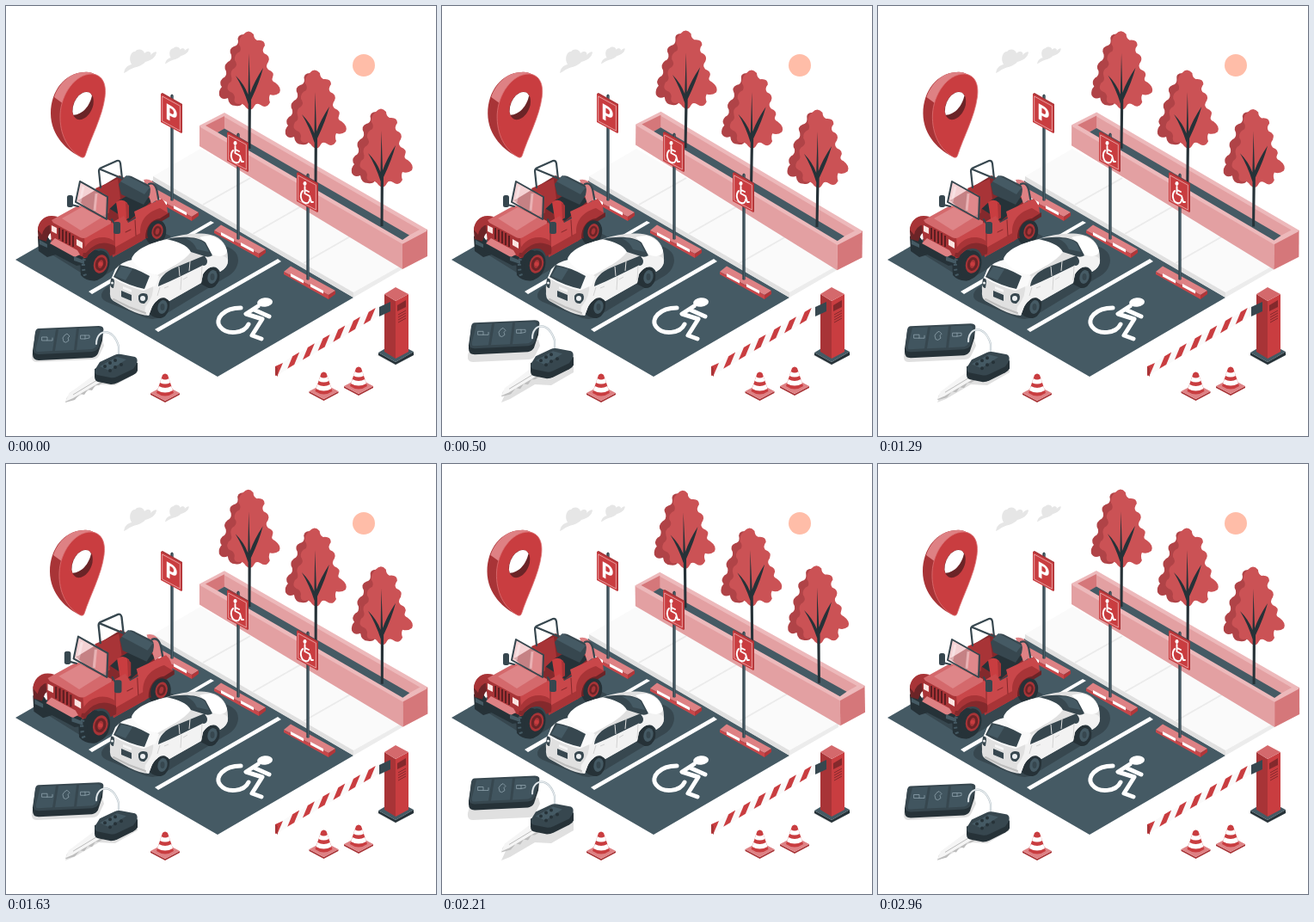
Write an HTML page that moves like this. It is 500x500 px and loops after 3 s.

```html
<!DOCTYPE html>
<html lang="en">
<head>
<meta charset="utf-8">
<title>Parking lot</title>
<style>
html, body { margin: 0; width: 100%; height: 100%; overflow: hidden; background: #fff; }
svg { display: block; width: 100vw; height: 100vh; }
.red { fill: #c93d40; } .deep { fill: #a83437; } .maroon { fill: #84292c; } .wine { fill: #6b2427; }
.side { fill: #c9474a; } .rose { fill: #de8184; } .pink { fill: #e3a0a2; } .pale { fill: #edb9bb; }
.slate { fill: #455a64; } .dark { fill: #37474f; } .ink { fill: #263238; }
.white { fill: #fff; } .mist { fill: #e6e6e6; }
.line { fill: none; stroke-linecap: round; stroke-linejoin: round; }
</style>
</head>
<body>
<svg viewBox="0 0 500 500">
<defs>
  <g id="tree">
    <path fill="#b04347" d="M277 33Q268 33 270 41Q270 46 265 47Q258 50 262 57Q263 63 258 65Q252 70 256 76Q257 82 252 84Q247 89 251 94Q247 98 248 104Q251 110 258 107Q259 116 267 116Q273 117 275 113L296 108L300 60Z"/>
    <path fill="#cb5255" d="M276 33Q282 26 288 33Q288 38 292 40Q301 39 301 46Q297 51 300 55Q308 58 305 65Q301 70 305 74Q313 77 310 83Q308 87 313 89Q321 95 318 101Q313 105 307 103Q305 107 307 112Q303 120 296 115Q291 112 289 116Q285 124 279 118Q275 112 271 114Q264 114 266 106Q265 101 261 100Q255 97 259 90Q264 87 262 82Q260 75 266 72Q270 68 266 63Q265 56 272 53Q274 49 271 45Q270 38 276 33Z"/>
    <path class="ink" d="M281.500 166L281.700 114Q276 96 267 81Q277 91 281.500 103L282.500 55L284 101Q289 87 299 72Q295 88 285 109L284.500 166Z"/>
  </g>
  <g id="stop">
    <path class="rose" d="M242 261L250 254.500L302 283L294 288Z"/>
    <path class="side" d="M242 261L294 288V293L242 264Z"/>
    <path fill="#b33639" d="M294 288L302 283V287L294 293Z"/>
    <path class="white" d="M250 263L265 271V274.500L250 266.500ZM273 275L288 283V286.500L273 278.500Z"/>
  </g>
  <g id="panel">
    <path class="deep" d="M257 147L259 146L282 159V192L281 193Z"/>
    <path class="red" d="M257 147L281 160V193L257 180Z"/>
    <path fill="none" stroke="#f1c4c5" stroke-width=".7" d="M258.700 150L279.300 161.200V190L258.700 178.800Z"/>
  </g>
  <g id="post">
    <path class="dark" d="M268.300 149Q270 146 271.700 149V271Q270 272 268.300 271Z"/>
    <path stroke="#607d8b" stroke-width=".5" d="M270.500 149V271"/>
  </g>
  <g id="access">
    <use href="#post"/><use href="#panel"/>
    <ellipse class="white" cx="266.500" cy="159.500" rx="2" ry="2.400"/>
    <path class="line" stroke="#fff" stroke-width="1.900" d="M266.500 163V171L272 174L274 181L276 181M267 167L271 169M264 168C260 172 262 181 267 182C270 183 272 181 272 178"/>
  </g>
  <g id="cone">
    <path class="deep" d="M168 450L185 459V461L168 452ZM202 450L185 459V461L202 452Z"/>
    <path class="rose" d="M168 450L185 441L202 450L185 459Z"/>
    <path class="red" d="M182 429Q185 426 188 429L195 450Q185 457 175 450Z"/>
    <path class="white" d="M180.700 433Q185 436 189.400 433L191 438Q185 441 179 438ZM177.800 442Q185 446 192.300 442L194 447Q185 452 176 447Z"/>
  </g>
  <path id="cloud" class="mist" d="M137 78C138 72 141 69 146 68C142 61 145 53 150 53C153 49 160 50 161 55C165 51 170 54 168 57C171 54 175 52 175 54C174 60 169 63 162 65C158 70 150 71 146 73C143 74 140 77 137 78Z"/>
</defs>

<use href="#cloud"/>
<use href="#cloud" transform="translate(85 10.500) scale(.73)"/>
<circle cx="416" cy="69" r="13" fill="#ffbda8"/>

<!-- ground -->
<path class="slate" d="M11 295L171 203L404 339L246 431Z"/>
<path class="white" d="M96 332L238 250L242 252L100 335ZM173 376L316 294L320 297L177 379Z"/>
<path fill="#fafafa" d="M171 198L226 166L461 302L404 333Z"/>
<path fill="#e0e0e0" d="M171 198L404 333V339L171 204Z"/>
<path fill="#ececec" d="M404 333L461 301V306L404 339Z"/>
<path fill="none" stroke="#ebebeb" stroke-width="2" d="M229 231L284 200M287 265L343 233M346 299L402 267"/>
<g class="line" stroke="#fff" stroke-width="5">
  <path d="M293 349L279 358L298 364L286 383L297 387M288 353L306 361"/>
  <path d="M273 351C253 351 242 364 249 373C257 383 277 381 282 370"/>
</g>
<ellipse class="white" cx="301" cy="344.500" rx="9" ry="5.200" transform="rotate(-6 301 344)"/>

<g id="garden">
  <path class="pale" d="M225 139L254 124L490 260L461 276Z"/>
  <path class="pink" d="M254 129L481 260L468 267L254 144Z"/>
  <path fill="#d5777a" d="M232 139L254 128V143L246 147Z"/>
  <path class="slate" d="M246 147L254 142.500L469 266.500L461 272Z"/>
  <path class="pink" d="M225 139L461 276V306L225 163Z"/>
  <path fill="#d5777a" d="M461 276L490 260V291L461 306Z"/>
  <path fill="none" stroke="#edb9bb" stroke-width="1.500" d="M226 140L461 276L489 261"/>
  <use href="#tree"/>
  <use href="#tree" x="77" y="45"/>
  <use href="#tree" x="154" y="90"/>
</g>

<use href="#stop" x="-78" y="-43"/><use href="#stop"/><use href="#stop" x="81" y="48"/>
<use href="#post" x="-77" y="-45"/><use href="#panel" x="-77" y="-45"/>
<text class="white" transform="matrix(.866 .5 0 1 192 134.500)" text-anchor="middle" font-family="Lato,'Open Sans',sans-serif" font-weight="900" font-size="25">P</text>
<use href="#access"/><use href="#access" x="81" y="47"/>

<g id="jeep">
  <path class="dark" d="M42 282L103 320L192 268L130 235Z"/>
  <path class="ink" d="M37 268Q45 262 51 272L58 289L48 292L38 285ZM86 293Q94 282 106 284L118 292Q120 312 106 319Q94 321 87 313Z"/>
  <ellipse class="ink" cx="174" cy="263" rx="12" ry="15" transform="rotate(14 174 263)"/>
  <!-- cabin -->
  <path class="maroon" d="M84 226L132 197L174 218L168 235L122 263Z"/>
  <path class="ink" d="M118 234L152 214L170 226L143 250Z"/>
  <path class="deep" d="M104 212L130 201L133 224L116 240Z"/>
  <path class="rose" d="M160 202Q169 200 174 209L177 224L169 230Z"/>
  <path class="dark" d="M131 207L138 199Q141 196 146 198L166 208Q169 211 167 220L160 231L134 219Z"/>
  <path class="slate" d="M133 204L140 197L167 211L161 219Z"/>
  <path class="red" d="M104 219Q110 214 117 220L120 240L108 246L102 235ZM128 228Q135 223 141 229L143 246L132 253Z"/>
  <path class="deep" d="M115 220Q119 221 119 228L120 240L116 242ZM139 228L143 232V246L140 248Z"/>
  <path class="line" stroke="#37474f" stroke-width="2.200" d="M110 211L108 192Q108 189 111 188L129 180Q132 179 133 183L135 201M110 190L134 200M166 207Q174 204 176 218L178 229"/>
  <!-- body side -->
  <path class="side" d="M121 253L137 244L142 252L151 247L149 239L181 224Q188 230 188 242L162 258L158 273L124 292Z"/>
  <path class="deep" d="M126 281L158 263L158 273L124 292Z"/>
  <path class="line" stroke="#84292c" stroke-width="1" d="M126 261V284M150 249L151 267M139 263L145 260"/>
  <path class="deep" d="M156 263C156 247 166 239 179 235L189 241Q182 246 178 249C168 251 162 261 163 270L157 274Z"/>
  <path class="wine" d="M162 270C162 257 169 248 179 247L190 240V245L180 251C173 252 168 260 167 270Z"/>
  <ellipse class="ink" cx="175" cy="263" rx="10.500" ry="14" transform="rotate(14 175 263)"/>
  <ellipse class="deep" cx="176" cy="262" rx="6.500" ry="9" transform="rotate(14 176 262)"/>
  <ellipse class="line" stroke="#6b2427" stroke-width="2.500" cx="176" cy="262" rx="3.500" ry="5" transform="rotate(14 176 262)"/>
  <!-- nose -->
  <path class="wine" d="M37 262C37 251 45 244 56 247L59 257L50 266L45 278L38 273Z"/>
  <path class="deep" d="M37 260C38 249 46 241 60 245L53 254Q44 256 42 266Z"/>
  <path class="deep" d="M51 253Q52 247 57 248L92 268L93 293L85 294L53 276Z"/>
  <path class="side" d="M91 269L122 251L126 283L107 280L93 291Z"/>
  <path fill="#d4696c" d="M53 249L82 233Q86 231 90 234L122 250Q123 253 120 254L94 269Q90 271 86 269L55 252Z"/>
  <path fill="#de8588" d="M65 247L88 234L111 246L87 261Z"/>
  <path fill="none" stroke="#5c1e21" stroke-width="2" d="M62 258V271M66 260V274M70 262V276M74 264V278M78 267V280"/>
  <path fill="#fbe4e1" d="M53 255L59 258V265L53 262ZM82 271L89 275V282L82 278Z"/>
  <path class="maroon" d="M89 291C91 277 106 267 122 274Q129 277 127 288L121 291Q118 281 109 282Q98 283 94 293Z"/>
  <path class="deep" d="M89 287C93 273 108 265 122 271Q127 273 127 279Q108 269 93 287Z"/>
  <path class="ink" d="M38 271L57 277L90 292L89 301L82 302L46 283L38 280Z"/>
  <path class="rose" d="M51 276L80 292L86 289L83 284L57 270Z"/>
  <path class="slate" d="M39 272L48 277V281L39 277ZM79 291L91 296V300L79 296Z"/>
  <ellipse class="ink" cx="108" cy="301" rx="12" ry="17" transform="rotate(16 108 301)"/>
  <ellipse class="deep" cx="110" cy="300" rx="8" ry="11" transform="rotate(16 110 300)"/>
  <ellipse class="line" stroke="#6b2427" stroke-width="3" cx="110" cy="300" rx="4.500" ry="6.500" transform="rotate(16 110 300)"/>
  <circle class="red" cx="110" cy="300" r="2.500"/>
  <path stroke="#455a64" stroke-width="4" stroke-dasharray="2 4" fill="none" d="M91 294Q88 304 93 316"/>
  <!-- windshield and mirrors -->
  <path fill="#edb7ba" fill-opacity=".62" stroke="#37474f" stroke-width="2" stroke-linejoin="round" d="M86 204L118 222L117 248L81 228Z"/>
  <path stroke="#fff" stroke-opacity=".35" stroke-width="3" d="M90 210L86 228M105 218L103 238"/>
  <path class="line" stroke="#37474f" stroke-width="2" d="M76 231L84 233M123 248L127 255"/>
  <rect class="dark" x="71" y="220" width="7" height="14" rx="2.500"/>
  <rect class="dark" x="125" y="251" width="8" height="14" rx="2.500"/>
</g>

<!-- white car -->
<path class="dark" d="M111 335Q115 324 130 324L244 277Q270 280 270 296Q269 309 255 316L181 361Q171 367 158 361L117 344Q110 341 111 335Z"/>
<path class="ink" d="M225 312Q229 301 241 303Q250 307 248 318Q245 328 236 328L226 323ZM166 352Q170 338 182 338L190 344Q191 358 180 363Q171 363 166 357Z"/>
<path fill="#e0e0e0" d="M121 331C120 315 128 303 146 296C151 284 169 275 187 271C204 265 223 263 238 266C252 269 258 280 258 293C259 302 254 306 249 309C245 300 235 302 229 312L227 322L190 343C184 336 173 341 169 352L166 360Q157 360 143 353L125 343Q120 340 121 331Z"/>
<path fill="#f2f2f2" d="M171 322C178 316 179 313 190 309L231 291L249 290Q257 291 258 296Q258 304 249 309C245 300 235 302 229 312L227 322L190 343C184 336 173 341 169 352L166 360Q160 358 162 350Q173 337 171 322Z"/>
<path class="white" d="M232 275L240 290L249 291Q257 290 257 285Q253 271 238 267Q230 267 225 269Z"/>
<path fill="#fafafa" d="M127 306Q135 297 147 295Q164 309 178 314L174 325L160 331Q140 326 123 316Z"/>
<path class="white" d="M146 294C150 282 173 273 188 272C205 274 214 280 215 286C207 297 190 305 176 313Q153 308 146 294Z"/>
<path class="dark" d="M132 301Q150 304 167 314L161 329Q142 325 125 315Z"/>
<path class="slate" d="M134 303L147 306L139 319L127 314Z"/>
<path class="dark" d="M187 271C204 267 224 268 232 275L240 290Q236 293 231 291L215 286C211 278 200 274 187 271Z"/>
<path class="slate" d="M209 270Q226 270 231 276L236 286L222 283Q219 275 209 270Z"/>
<path class="dark" d="M177 326C178 316 185 309 197 304L231 290L233 295L228 302C211 310 194 319 177 326Z"/>
<path fill="none" stroke="#c9c9c9" stroke-width=".8" d="M204 315L203 330M228 302L227 319M179 327L176 337M206 318L211 315M184 328L189 326"/>
<path stroke="#e0e0e0" stroke-width="1" d="M201 303L202 314M214 297L213 308"/>
<ellipse class="dark" cx="230" cy="297" rx="4" ry="5"/>
<path class="dark" d="M122 317Q126 316 126 321L125 328Q122 328 121 324ZM134 331L146 336V343L134 338ZM154 337Q157 332 164 335Q167 341 161 346Q153 347 154 337Z"/>
<path fill="#f5f5f5" d="M136 326L146 330V333L136 329Z"/>
<circle cx="159" cy="340" r="3" fill="#eceff1"/><circle cx="123.500" cy="322" r="1.500" fill="#eceff1"/>
<path class="line" stroke="#bdbdbd" stroke-width="2" d="M125 341L143 350L162 357"/>
<g class="ink">
  <ellipse cx="181" cy="351" rx="8.500" ry="12" transform="rotate(14 181 351)"/>
  <ellipse cx="239" cy="316" rx="8.500" ry="12" transform="rotate(14 239 316)"/>
</g>
<g class="slate">
  <ellipse cx="182" cy="350" rx="5.500" ry="8" transform="rotate(14 182 350)"/>
  <ellipse cx="240" cy="315" rx="5.500" ry="8" transform="rotate(14 240 315)"/>
</g>
<g class="dark">
  <ellipse cx="182" cy="350" rx="2.500" ry="4"/><ellipse cx="240" cy="315" rx="2.500" ry="4"/>
</g>

<!-- barrier -->
<path class="mist" d="M431 406L453 394L476 405L453 418Z"/>
<path class="ink" d="M433 403L453 414L474 402V406L453 417L433 406Z"/>
<path class="slate" d="M433 403L453 391L474 402L453 414Z"/>
<path class="deep" d="M440 335L453 343V410L440 402Z"/>
<path class="red" d="M453 343L468 335V402L453 410Z"/>
<path fill="#d4696c" d="M440 335L453 327L468 335L453 343Z"/>
<path class="maroon" d="M455 348L465 342V350L455 355Z"/>
<path fill="none" stroke="#84292c" stroke-width="1" d="M456 359L465 354M456 362L465 357M456 365L465 360M456 368L465 363"/>
<path class="dark" d="M434 350L447 344V355L434 361Z"/>
<path fill="#fafafa" d="M314 419L434 349V360L314 430Z"/>
<g id="stripes" class="red"></g>
<path class="deep" d="M313 419L316 421V431L313 428Z"/>

<use href="#cone"/><use href="#cone" x="184.500" y="-2"/><use href="#cone" x="225" y="-8"/>

<!-- keys -->
<path fill="#e0e0e0" d="M30 406L34 391L112 388L114 395L108 407Q106 411 100 411L36 414Q29 414 30 406ZM69 461L74 450L104 430Q106 418 128 409L153 416V426L127 441L108 440L79 457Z"/>
<g id="keys">
  <path fill="#bdbdbd" d="M102 431L113 438L108 441L104 441L100 447L95 446L91 452L86 451L80 458L69 461L71 455Z"/>
  <path fill="#f5f5f5" d="M101 430L112 436L78 456L69 460L73 451Z"/>
  <path stroke="#bdbdbd" stroke-width="1" d="M106 435L78 452"/>
  <path class="ink" d="M31 401L34 381L113 379L112 389L107 404Q105 408 100 409L38 412Q31 412 31 405Z"/>
  <path class="dark" d="M38 375L108 372Q115 372 113 379L108 397Q106 401 100 402L38 405Q31 405 32 398L34 379Q35 375 38 375Z"/>
  <path fill="#41555f" d="M40 377L58 376L54 401L37 402Q34 402 35 397ZM61 376L82 375L79 400L57 401ZM85 375L106 374Q111 374 110 379L106 394Q104 398 100 399L82 400Z"/>
  <path class="line" stroke="#90a4ae" stroke-width=".8" d="M42 385H48V389H42ZM48 389H54V386M67 390L66 386L68 383L71 381L74 384L72 386L73 389L70 391ZM87 383H92V387H87ZM92 387L97 386V383L92 383"/>
  <path class="line" stroke="#b0bec5" stroke-width="2.200" d="M105 393C105 375 125 373 131 396L131 410"/>
  <path class="line" stroke="#eceff1" stroke-width="1.200" d="M105 393C105 375 125 373 131 396L131 410"/>
  <path class="ink" d="M103 422L128 412L153 415V424Q152 427 148 429L130 438Q126 440 122 440L107 437Q103 436 103 431Z"/>
  <path class="dark" d="M104 422L109 414L126 406Q130 404 134 405L150 408Q154 410 152 416L148 422L129 431Q125 433 121 432L106 429Q102 427 104 422Z"/>
  <path class="slate" d="M109 419L129 408L140 411L120 424Z"/>
  <g class="ink">
    <circle cx="115" cy="419" r="2"/><circle cx="121" cy="415" r="2"/><circle cx="127" cy="412" r="2"/>
    <circle cx="121" cy="424" r="2"/><circle cx="127" cy="420" r="2"/><circle cx="134" cy="417" r="2"/>
  </g>
</g>

<g id="pin">
  <path class="deep" d="M88 176C72 169 52 151 52 125C52 98 69 78 90 77Q98 76 104 80L91 173Z"/>
  <path class="rose" d="M56 106C62 89 75 77 91 77Q99 76 105 81Q83 87 67 114Z"/>
  <path class="red" stroke="#dc7174" stroke-width=".8" d="M88 176C72 168 62 149 63 126C64 103 80 79 100 79C113 80 117 92 115 106C112 129 99 152 92 174Q91 177 88 176Z"/>
  <g transform="rotate(25 89.500 116)">
    <ellipse class="wine" cx="89.500" cy="116" rx="11" ry="17"/>
    <path class="white" d="M89.500 99A11 17 0 0 0 84 130.500C93 126 97 113 94 101Q92 99 89.500 99Z"/>
  </g>
</g>
</svg>
<script>
const LOOP = 3000;
const el = id => document.getElementById(id);
const move = (id, value) => el(id).setAttribute('transform', value);
const linear = p => p;
const easeOut = p => 1 - (1 - p) ** 2.4;

// Interpolates [time, value] pairs.
function at(keys, t, ease = linear) {
  const i = keys.findIndex(k => k[0] > t);
  const [t0, v0] = keys[i - 1], [t1, v1] = keys[i];
  return v0 + (v1 - v0) * ease((t - t0) / (t1 - t0));
}

const wind = [[0, 0], [750, 1], [2250, -1], [LOOP, 0]];
const beat = [[0, 1], [300, 1.1], [450, 1], [1500, 1], [1800, 1.1], [1950, 1], [LOOP, 1]];
const sway = [[0, 0], [500, 1.2], [920, 2], [1630, -1], [2000, 0.9], [2460, 0], [LOOP, 0]];

let stripes = '<path d="M313 430l3 -1l6 -14l-9 4z"/>';
for (let i = 1; i < 7; i++) {
  stripes += `<path d="M${309.500 + i * 17.7} ${432 - i * 10.3}l8 -4.700l6 -14.500l-8 4.700z"/>`;
}
el('stripes').innerHTML = stripes;

function draw(now) {
  const t = now % LOOP;
  move('garden', `rotate(${at(wind, t)} 358 168)`);
  move('jeep', `translate(113 249) scale(${at(beat, t, easeOut)}) translate(-113 -249)`);
  move('keys', `translate(0 ${-10 * (1 - Math.abs(t % 1500 / 750 - 1))})`);
  move('pin', `translate(${at(sway, t)} 0)`);
  requestAnimationFrame(draw);
}
requestAnimationFrame(draw);
</script>
</body>
</html>
```
